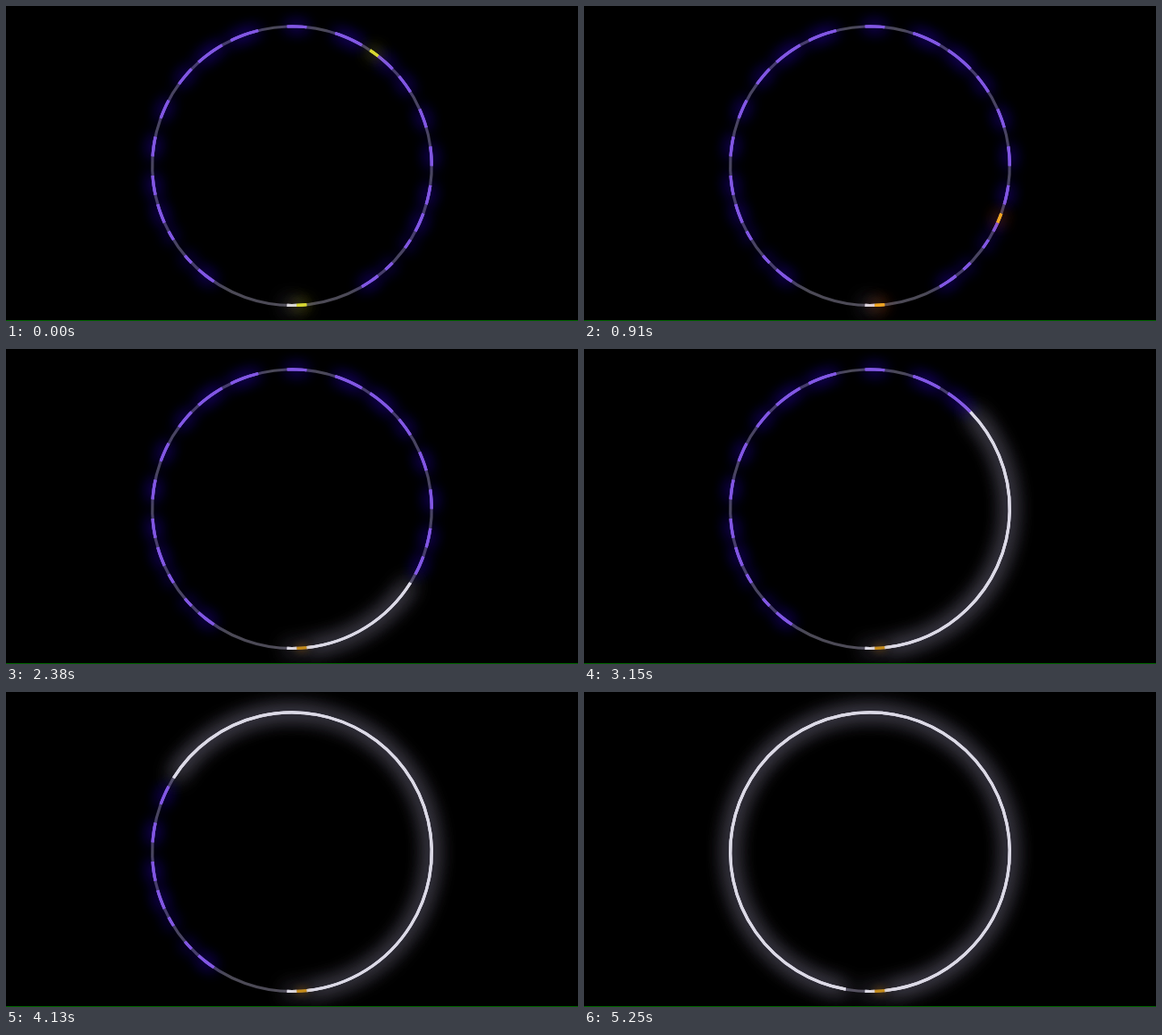
Animation of 640x353 px, one loop 5320 ms. Source, as an HTML page with a canvas:

```html
<!DOCTYPE html>
<html lang="en">
<head>
<meta charset="utf-8">
<title>Light ring</title>
<style>
html, body { margin: 0; width: 100%; height: 100%; overflow: hidden; background: #000; }
canvas { display: block; }
</style>
</head>
<body>
<canvas id="stage" width="640" height="353"></canvas>
<script>
const ctx = document.getElementById('stage').getContext('2d');
const LOOP = 5320, TICK = 70;
const CX = 320, CY = 179.2, R = 156.3;
const STEP = Math.PI / 45; // 90 lamps, number 0 at the top, clockwise
const HOME = 45, GATE = 44, BOUNCE = 27;

// [first lamp, count] of each purple run
const RUNS = [
  [0, 2], [5, 3], [9, 3], [13, 2], [17, 2], [21, 2], [25, 2], [28, 2], [31, 1], [34, 1], [36, 2],
  [54, 2], [57, 1], [60, 1], [62, 2], [65, 2], [69, 2], [73, 2], [77, 2], [80, 3], [84, 3]
];

// [tick, lamp] the runner goes down to the gate, then the white fill runs back round
const PATH = [[0, 9], [13, 28], [21, 37], [BOUNCE, GATE], [34, 31], [45, 12], [59, -14], [75, -42]];

function lampAt(tick) {
  let i = 1;
  while (i < PATH.length - 1 && tick > PATH[i][0]) i++;
  const [t0, a] = PATH[i - 1], [t1, b] = PATH[i];
  return Math.round(a + (b - a) * (tick - t0) / (t1 - t0));
}

function strokeRuns(runs, color, glow, blur, passes = 1) {
  ctx.beginPath();
  for (const [first, count] of runs) {
    const from = (first - 0.5) * STEP - Math.PI / 2;
    ctx.moveTo(CX + R * Math.cos(from), CY + R * Math.sin(from));
    ctx.arc(CX, CY, R, from, from + count * STEP);
  }
  ctx.strokeStyle = color;
  ctx.shadowColor = glow;
  ctx.shadowBlur = blur;
  while (passes--) ctx.stroke();
  ctx.shadowBlur = 0;
}

function draw(tick) {
  const lamp = lampAt(tick), filling = tick >= BOUNCE;
  const warm = Math.min(1, tick / 13);
  const mix = (a, b) => Math.round(a + (b - a) * warm);
  const amber = `rgb(${mix(215, 240)},${mix(215, 165)},${mix(50, 35)})`;
  const amberGlow = `rgb(${mix(180, 220)},${mix(180, 90)},0)`;

  ctx.fillStyle = '#000';
  ctx.fillRect(0, 0, 640, 353);
  ctx.lineWidth = 3.2;
  strokeRuns([[0, 90]], '#4c4a56', 'transparent', 0);

  // a run is cut where the runner or the fill covers it
  const purple = [];
  for (const [first, count] of RUNS) {
    for (let n = first; n < first + count; n++) {
      const covered = filling
        ? (n >= lamp && n < GATE) || n - 90 >= lamp
        : n === lamp;
      if (!covered) purple.push([n, 1]);
    }
  }
  strokeRuns(purple, '#8257e4', '#3208f0', 17, 2);

  const white = [[HOME, 1]];
  if (filling && lamp < GATE) white.push([lamp, GATE - lamp]);
  strokeRuns(white, '#dcdae6', '#d2caf0', 22, 2);

  if (filling) {
    strokeRuns([[GATE, 1]], '#c48a18', '#a60', 10);
  } else {
    strokeRuns([[GATE, 1], [lamp, 1]], amber, amberGlow, 17, 2);
  }

  ctx.fillStyle = '#006400';
  ctx.fillRect(0, 352, 640, 1);
}

const start = performance.now();
function loop() {
  draw(Math.floor((performance.now() - start) % LOOP / TICK));
  requestAnimationFrame(loop);
}
loop();
</script>
</body>
</html>
```
